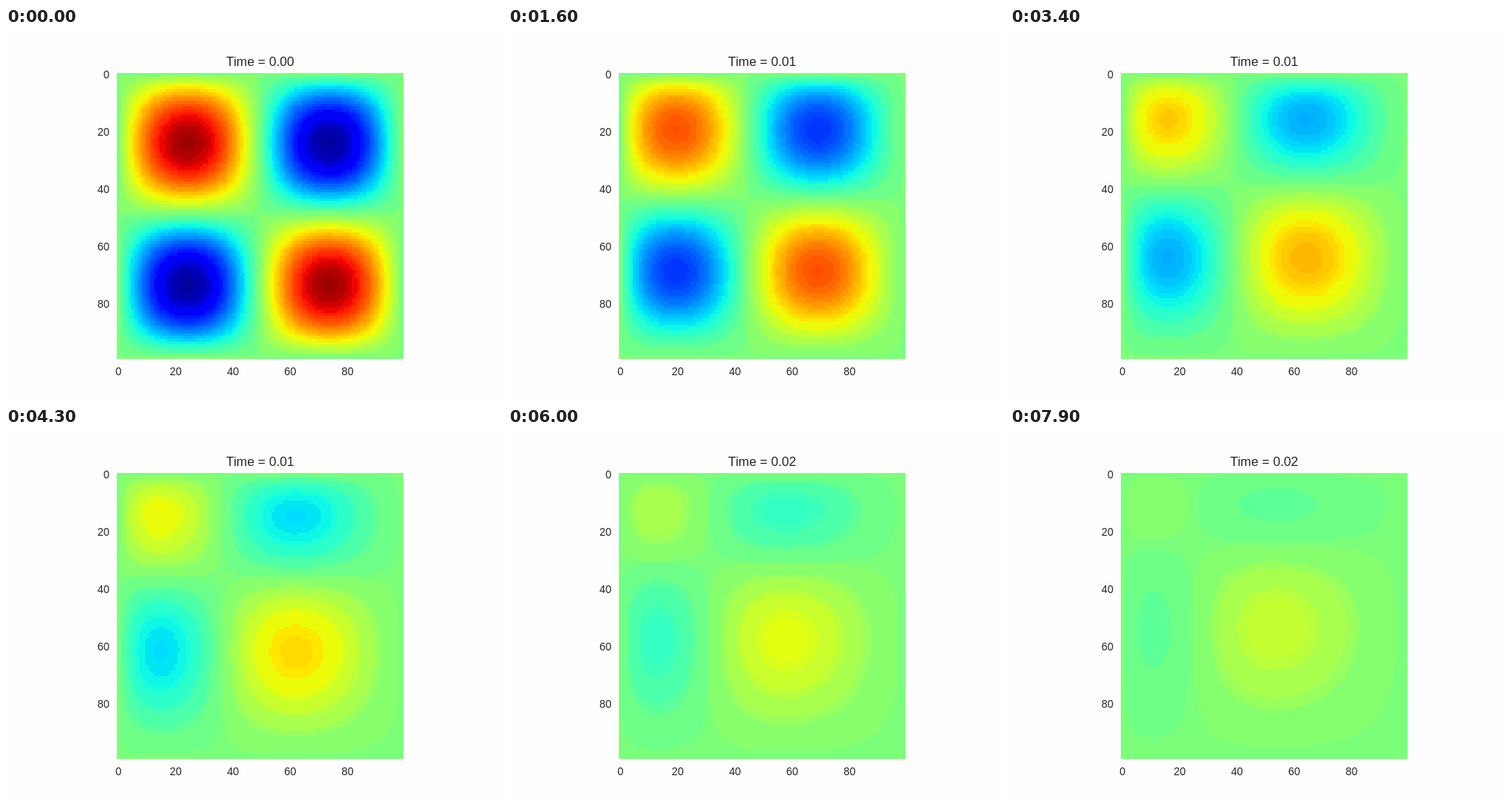
Recreate the animation shown at these times as an HTML page with a canvas. Size 640 by 480 pixels, loop 8000 ms.

```html
<!DOCTYPE html>
<html lang="en">
<head>
<meta charset="utf-8">
<title>Drifting heat map</title>
<style>
  html, body { margin: 0; width: 100%; height: 100%; overflow: hidden; background: #fefefe; }
  canvas, svg { position: absolute; left: 0; top: 0; width: 640px; height: 480px; }
  text { font-family: Arial, "Liberation Sans", sans-serif; font-size: 13.89px; fill: #262626; }
  #title { font-size: 16.67px; }
</style>
</head>
<body>
<canvas id="map" width="640" height="480"></canvas>
<svg id="axes" viewBox="0 0 640 480">
  <text id="title" x="328" y="49" text-anchor="middle">Time = 0.00</text>
</svg>
<script>
const N = 100, SIZE = 370, LEFT = 143, TOP = 57, CLIP = 1;
const FRAMES = 80, FRAME_MS = 100;
const DT = 0.0003, FIRST_STEP = 2;
const DRIFT = 10, MODES = 60;

const title = document.getElementById("title");
const ctx = document.getElementById("map").getContext("2d");
const image = ctx.createImageData(SIZE, SIZE);
const pixels = new Uint32Array(image.data.buffer);
const cellOf = Array.from({ length: SIZE }, (_, p) => Math.floor((p + 0.5) * N / SIZE));

// Piecewise linear channels of the jet colour map: [position, level]
const JET = [
  [[0, 0], [0.35, 0], [0.66, 1], [0.89, 1], [1, 0.5]],
  [[0, 0], [0.125, 0], [0.375, 1], [0.64, 1], [0.91, 0], [1, 0]],
  [[0, 0.5], [0.11, 1], [0.34, 1], [0.65, 0], [1, 0]]
];

function ramp(points, x) {
  let i = 1;
  while (i < points.length - 1 && x > points[i][0]) i++;
  const [x0, y0] = points[i - 1], [x1, y1] = points[i];
  return Math.floor(255 * (y0 + (y1 - y0) * (x - x0) / (x1 - x0)) + 1e-9);
}

const lut = Array.from({ length: 256 }, (_, i) => JET.map(c => ramp(c, i / 255)));
const binOf = lut.map(([r, g, b]) => (r >> 5) << 7 | (g >> 4) << 3 | b >> 5);

// Sine series of exp(a x) sin(2 pi x), zero at both walls
const A = DRIFT / 2, PI2 = Math.PI ** 2;
const coef = Array.from({ length: MODES }, (_, i) => {
  const k = i + 1, sign = k % 2 ? -1 : 1;
  return A * (Math.exp(A) * sign - 1) *
    (1 / (A * A + (k - 2) ** 2 * PI2) - 1 / (A * A + (k + 2) ** 2 * PI2));
});

// One axis of the drifting, diffusing wave; the field is its product in x and y
function profile(t) {
  const weights = coef.map((c, i) => c * Math.exp(-((i + 1) ** 2) * PI2 * t));
  return Array.from({ length: N }, (_, j) => {
    if (j === 0 || j === N - 1) return 0;
    const x = j / (N - 1);
    const sum = weights.reduce((s, w, i) => s + w * Math.sin((i + 1) * Math.PI * x), 0);
    return sum * Math.exp(-A * x - A * A * t);
  });
}

function drawMap(t) {
  const f = profile(t);
  const levels = new Uint8Array(N * N);
  const counts = new Array(256).fill(0);
  for (let y = 0; y < N; y++) {
    for (let x = 0; x < N; x++) {
      const level = Math.floor((f[x] * f[y] + 1) * 128 + 1e-9);
      levels[y * N + x] = Math.max(0, Math.min(255, level));
      counts[levels[y * N + x]]++;
    }
  }

  // Levels sharing a coarse colour bin show the bin's mean colour
  const bins = {};
  counts.forEach((n, i) => {
    if (!n) return;
    const bin = bins[binOf[i]] ||= { n: 0, rgb: [0, 0, 0] };
    bin.n += n;
    lut[i].forEach((v, c) => bin.rgb[c] += v * n);
  });
  const colors = binOf.map(key => {
    if (!bins[key]) return 0;
    const [r, g, b] = bins[key].rgb.map(v => Math.floor(v / bins[key].n));
    return (255 << 24 | b << 16 | g << 8 | r) >>> 0;
  });

  for (let y = 0; y < SIZE; y++) {
    for (let x = 0; x < SIZE; x++) {
      pixels[y * SIZE + x] = colors[levels[cellOf[y] * N + cellOf[x]]];
    }
  }
  ctx.putImageData(image, LEFT, TOP, 0, CLIP, SIZE, SIZE - CLIP);
}

function addLabel(text, x, y, anchor) {
  const el = document.createElementNS("http://www.w3.org/2000/svg", "text");
  el.setAttribute("x", x);
  el.setAttribute("y", y);
  el.setAttribute("text-anchor", anchor);
  el.textContent = text;
  document.getElementById("axes").append(el);
}

for (let v = 0; v < N; v += 20) {
  const offset = (v + 0.5) * 3.696;
  addLabel(v, 143.2 + offset, 448, "middle");
  addLabel(v, 133.5, Math.round(57.6 + offset + 5.4), "end");
}

const start = performance.now();
let shown = -1;

function tick() {
  const frame = Math.floor((performance.now() - start) / FRAME_MS) % FRAMES;
  if (frame !== shown) {
    shown = frame;
    const t = (frame + FIRST_STEP) * DT;
    drawMap(t);
    title.textContent = "Time = " + t.toFixed(2);
  }
  requestAnimationFrame(tick);
}
tick();
</script>
</body>
</html>
```
